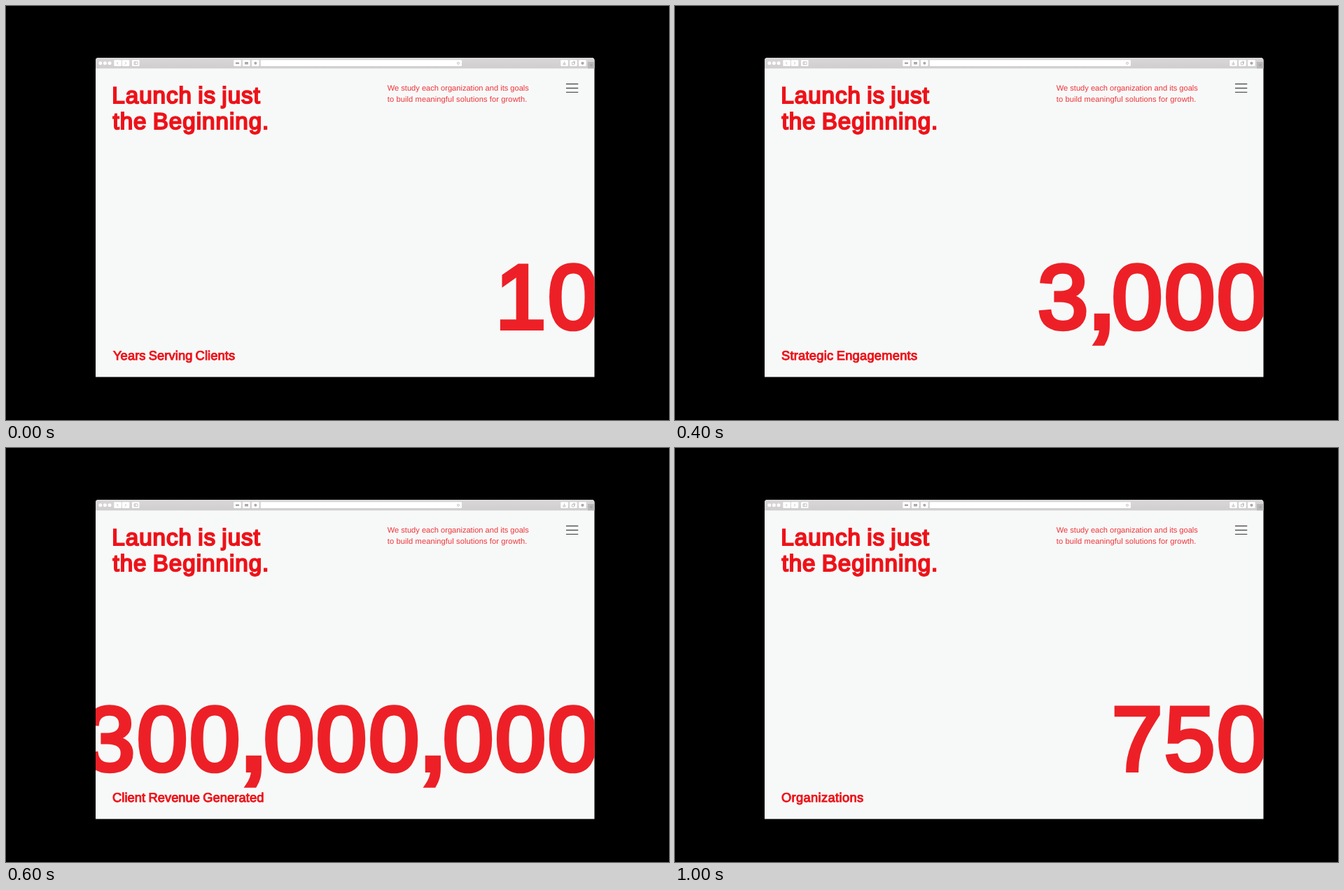
Recreate the animation shown at these times as an HTML page. Size 947x592 px, loop 1200 ms.

```html
<!DOCTYPE html>
<html lang="en">
<head>
<meta charset="utf-8">
<title>Launch is just the Beginning.</title>
<style>
  html, body { margin: 0; width: 100%; height: 100%; overflow: hidden; background: #000; }
  svg { display: block; width: 100%; height: 100%; }
  text {
    font-family: "Liberation Sans", Arial, sans-serif;
    text-rendering: geometricPrecision;
    white-space: pre;
  }
  .strong { fill: #ee1219; stroke: #ee1219; }
  .title { font-size: 33.2px; stroke-width: 2px; letter-spacing: .97px; word-spacing: -2px; }
  .label { font-size: 18.3px; stroke-width: .95px; word-spacing: -1px; }
  .intro { font-size: 11.1px; fill: #ee1219; fill-opacity: .86; }
  .number { font-size: 130px; fill: #ed2027; stroke: #ed2027; stroke-width: 6px; letter-spacing: 2.7px; }
  .comma { font-size: 170px; letter-spacing: -9.3px; }
</style>
</head>
<body>
<svg viewBox="0 0 947 592" xmlns="http://www.w3.org/2000/svg">
  <defs>
    <linearGradient id="chrome" x2="0" y2="1">
      <stop stop-color="#d9d7d8"/>
      <stop offset="1" stop-color="#d0cecf"/>
    </linearGradient>
    <clipPath id="window">
      <path d="M128 530.5V78q0-4 4-4H836.500q4 0 4 4V530.500Z"/>
    </clipPath>
  </defs>
  <rect width="947" height="592"/>
  <g clip-path="url(#window)">
    <rect x="128" y="74" width="713" height="457" fill="#f7f9f8"/>
    <rect x="128" y="74" width="713" height="15.300" fill="url(#chrome)"/>
    <rect x="831" y="80" width="10" height="9.300" fill="#b9b7b8"/>
    <path d="M834 84.500h4M836 82.500v4" stroke="#a19fa0" stroke-width=".8"/>
    <g id="controls" fill="#fff"></g>
    <g fill="none" stroke="#bbb" stroke-width=".9">
      <path d="M160.200 80l-1.700 1.800 1.700 1.800M170 80l1.700 1.800-1.700 1.800"/>
      <path d="M183 79.800h5v4h-5zM184.800 79.800v4"/>
      <path d="M797.500 79.500v3.500M796 81.500v2.500h3v-2.500M808.500 80.500h3v3.500h-3zM810 79.300h2.500v3.200"/>
      <circle cx="646" cy="81.800" r="1.500"/>
    </g>
    <g fill="#aaa">
      <path d="M328 80.500h5v2.500h-5zM341 80h5v3.500h-5z"/>
      <circle cx="356.400" cy="81.800" r="2"/>
      <circle cx="823.500" cy="81.800" r="2.100"/>
    </g>
    <path d="M800 111.500h17.300M800 117.500h17.300M800 123.300h17.300" stroke="#555" stroke-width="1.300"/>

    <g class="strong title">
      <text x="151.300" y="139.200">Launch is just</text>
      <text x="152.500" y="175.600">the Beginning.</text>
    </g>
    <g class="intro">
      <text x="544.800" y="121.200">We study each organization and its goals</text>
      <text x="544.800" y="137.100" letter-spacing=".1">to build meaningful solutions for growth.</text>
    </g>
    <text id="number" class="number" y="461"></text>
    <text id="label" class="strong label" y="505.600"></text>
  </g>
</svg>
<script>
  const STEP = 200;
  const DIGIT = 75, COMMA = 31, RIGHT = 849;
  const stats = [
    { value: 10, label: "Years Serving Clients", x: 153, track: .1 },
    { value: 750, label: "Organizations", x: 152, track: .36 },
    { value: 3000, label: "Strategic Engagements", x: 152, track: .25 },
    { value: 300000000, label: "Client Revenue Generated", x: 152, track: .08 }
  ];
  const number = document.getElementById("number");
  const label = document.getElementById("label");
  const controls = document.getElementById("controls");

  const button = (x, w) => `<rect x="${x}" y="77.2" width="${w}" height="8.9" rx="1"/>`;
  controls.innerHTML =
    [134.8, 141.4, 148].map(x => `<circle cx="${x}" cy="81.7" r="2.5"/>`).join("") +
    [154.3, 165.8, 180, 325.2, 338, 351, 792.3, 805.2, 818.2].map(x => button(x, 10.5)).join("") +
    button(363.8, 287.2);

  // Numbers grow leftwards from a fixed right edge.
  function show({ value, label: words, x, track }) {
    const digits = value.toLocaleString("en-US");
    const commas = digits.split(",").length - 1;
    number.setAttribute("x", RIGHT - (digits.length - commas) * DIGIT - commas * COMMA);
    number.innerHTML = digits.replace(/,/g, '<tspan class="comma" dx="-7">,</tspan>');
    label.setAttribute("x", x);
    label.style.letterSpacing = track + "px";
    label.textContent = words;
  }

  let shown = -1;
  function draw(time) {
    // Step up through the stats, then back down.
    const last = stats.length - 1;
    const step = Math.floor(time / STEP) % (2 * last);
    const index = last - Math.abs(last - step);
    if (index !== shown) show(stats[shown = index]);
  }

  function tick() {
    draw(performance.now() - start);
    requestAnimationFrame(tick);
  }
  const start = performance.now();
  tick();
</script>
</body>
</html>
```
